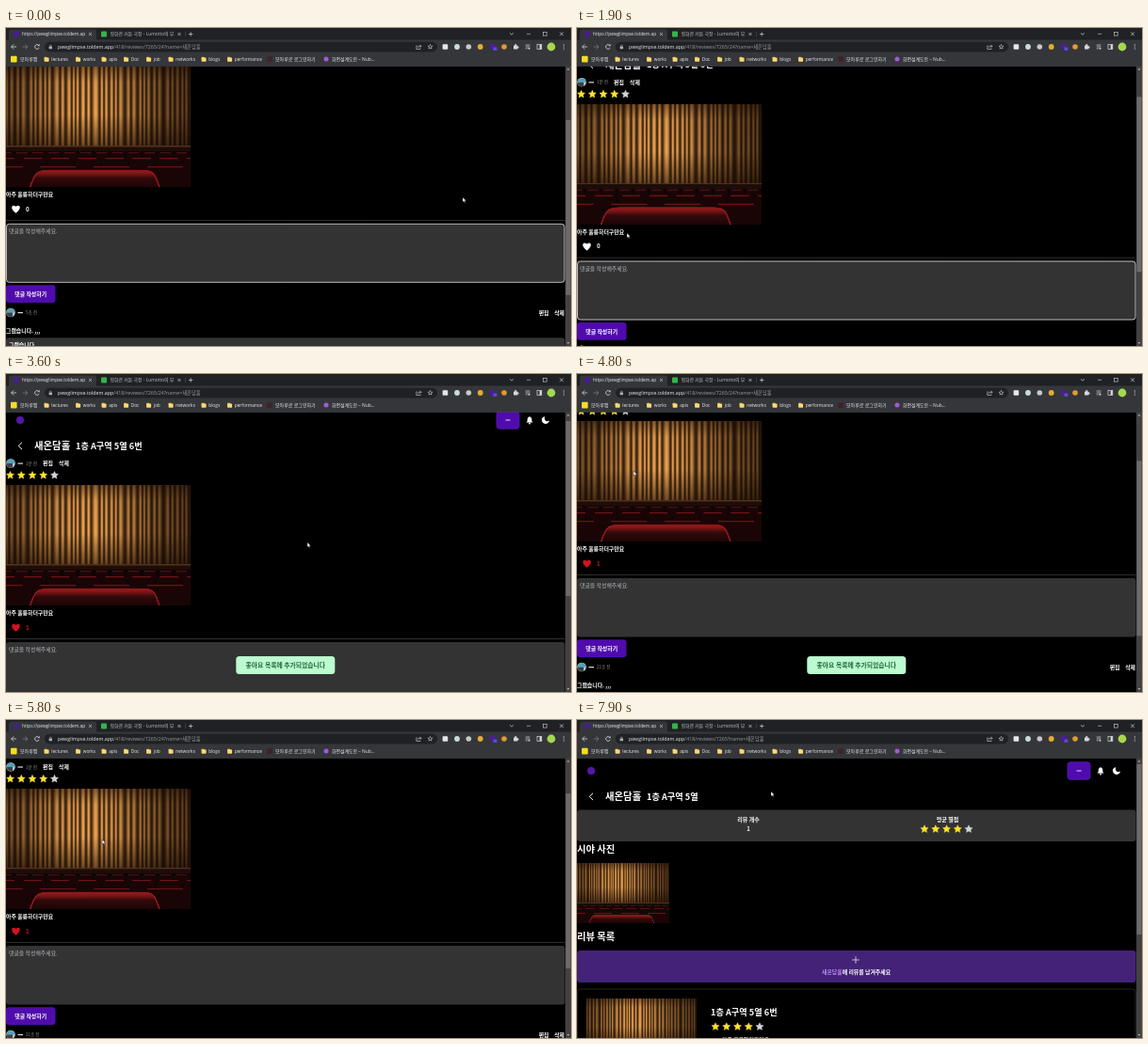
These frames come from a looping animation (600 px wide and 338 px high, 8000 ms). An HTML page with a canvas:

```html
<!DOCTYPE html>
<html lang="ko">
<head>
<meta charset="utf-8">
<title>Seat review</title>
<style>
html, body { margin: 0; width: 100%; height: 100%; overflow: hidden; background: #000; }
canvas { display: block; width: 600px; height: 338px; }
</style>
</head>
<body>
<canvas id="stage"></canvas>
<script>
const W = 600, H = 338, LOOP = 8000, TOP = 40.5, PAGE_W = 593.5;
const PAGE_FONT = '"Noto Sans CJK KR", "Noto Sans CJK", "Noto Sans", sans-serif';
const UI_FONT = '"Open Sans", "Noto Sans CJK KR", "Noto Sans CJK", sans-serif';
const VENUE = '새온담홀', HOST = 'pewglimpse.toldem.app';
const PURPLE = '#500bad', GREY = '#333333';

const canvas = document.getElementById('stage');
const dpr = window.devicePixelRatio || 1;
canvas.width = W * dpr;
canvas.height = H * dpr;
let c = canvas.getContext('2d');

function rect(x, y, w, h, fill) {
  c.fillStyle = fill;
  c.fillRect(x, y, w, h);
}
function round(x, y, w, h, r, fill, stroke, lw = 1) {
  c.beginPath();
  c.roundRect(x, y, w, h, r);
  if (fill) { c.fillStyle = fill; c.fill(); }
  if (stroke) { c.strokeStyle = stroke; c.lineWidth = lw; c.stroke(); }
}
function dot(x, y, r, fill) {
  c.beginPath();
  c.arc(x, y, r, 0, Math.PI * 2);
  c.fillStyle = fill;
  c.fill();
}
function line(pts, color, lw = 0.8) {
  c.beginPath();
  for (let i = 0; i < pts.length; i += 2) c.lineTo(pts[i], pts[i + 1]);
  c.strokeStyle = color;
  c.lineWidth = lw;
  c.stroke();
}
function poly(pts, fill, stroke, lw) {
  c.beginPath();
  for (let i = 0; i < pts.length; i += 2) c.lineTo(pts[i], pts[i + 1]);
  c.closePath();
  c.fillStyle = fill;
  c.fill();
  if (stroke) { c.strokeStyle = stroke; c.lineWidth = lw; c.stroke(); }
}
function text(s, x, y, size, color = '#fff', weight = 700, align = 'left', font = PAGE_FONT) {
  c.font = `${weight} ${size}px ${font}`;
  c.textAlign = align;
  c.textBaseline = 'alphabetic';
  c.fillStyle = color;
  c.fillText(s, x, y + size * 0.36);
}
const uiText = (s, x, y, size, color) => text(s, x, y, size, color, 400, 'left', UI_FONT);

// Eased interpolation through [time, ...values] keys
function track(keys, t) {
  let i = 0;
  while (i < keys.length - 2 && t >= keys[i + 1][0]) i++;
  const a = keys[i], b = keys[i + 1];
  const p = Math.min(1, Math.max(0, (t - a[0]) / (b[0] - a[0])));
  const e = p * p * (3 - 2 * p);
  return a.slice(1).map((v, k) => v + (b[k + 1] - v) * e);
}

const scrollKeys = [[0, 77], [200, 77], [520, 37.3], [3250, 37.3], [3600, 0], [3700, -5],
  [4600, -5], [4800, 68], [5000, 73], [5380, 155], [5550, 155], [5950, -5], [8000, -5]];
const pointerKeys = [[0, 485, 180], [1000, 485, 180], [1800, 53, 218], [1950, 53, 218],
  [2200, 11, 231], [2650, 11, 231], [3350, 320, 179], [3750, 320, 179], [4500, 60, 103],
  [4800, 60, 103], [5200, 154, 152], [5550, 154, 152], [6150, 17, 86], [6800, 17, 86],
  [7600, 206, 76], [8000, 206, 76]];
const LIKE = 2250, BACK = 6400, LOADED = 7000;

// Seat row: dark backs with a dim red upper edge
function seatRow(start, y, step, h, edge) {
  for (let x = start; x < 196; x += step) {
    round(x, y, step - 1.5, h, step * 0.16, '#190506');
    line([x + step * 0.13, y + 0.6, x + step * 0.8, y + 0.6], edge, 1.5);
  }
}

// Lit stage curtain above rows of seats, drawn once
const photo = document.createElement('canvas');
photo.width = 784;
photo.height = 512;
function paintPhoto() {
  const main = c;
  c = photo.getContext('2d');
  c.scale(4, 4);
  rect(0, 0, 196, 128, '#100405');
  for (let x = 0; x < 196; x += 0.5) {
    const fold = 0.5 + 0.5 * Math.sin(x * 1.08 + 1.5 * Math.sin(x * 0.17) + 0.7 * Math.sin(x * 0.43));
    const light = 0.36 + 0.64 * Math.exp(-(((x - 86) / 66) ** 2));
    const v = (0.24 + 0.76 * fold) * light;
    rect(x, 0, 0.6, 85, `rgb(${245 * v + 8},${172 * v + 1},${84 * v})`);
  }
  const shade = c.createLinearGradient(0, 0, 0, 85);
  shade.addColorStop(0, 'rgba(20,8,2,.5)');
  shade.addColorStop(0.2, 'rgba(20,8,2,.1)');
  shade.addColorStop(0.6, 'rgba(20,8,2,.05)');
  shade.addColorStop(1, 'rgba(20,8,2,.6)');
  rect(0, 0, 196, 85, shade);
  rect(0, 84, 196, 1.6, '#54301a');
  rect(0, 85.6, 196, 4.4, '#1c0d08');
  seatRow(-8, 91, 17, 10, '#4c1012');
  seatRow(-14, 97, 29, 14, '#6c1416');
  seatRow(-28, 106, 57, 26, '#6c1215');
  c.beginPath();
  c.moveTo(25, 130);
  c.bezierCurveTo(31, 113, 32, 111, 46, 110.5);
  c.lineTo(145, 110.5);
  c.bezierCurveTo(158, 111, 158, 113, 164, 130);
  c.closePath();
  const seat = c.createLinearGradient(0, 109, 0, 128);
  seat.addColorStop(0, '#a81c20');
  seat.addColorStop(0.25, '#7d1417');
  seat.addColorStop(0.5, '#330a0b');
  seat.addColorStop(1, '#1c0506');
  c.fillStyle = seat;
  c.fill();
  c.strokeStyle = '#8f181b';
  c.lineWidth = 1.6;
  c.stroke();
  c = main;
}
const drawPhoto = (x, y, w, h) => c.drawImage(photo, x, y, w, h);

function star(x, y, fill) {
  const pts = [];
  for (let i = 0; i < 10; i++) {
    const r = i % 2 ? 2.1 : 4.3, a = i * Math.PI / 5 - Math.PI / 2;
    pts.push(x + r * Math.cos(a), y + r * Math.sin(a));
  }
  poly(pts, fill, fill, 0.4);
}
function stars(x, y) {
  for (let i = 0; i < 5; i++) star(x + i * 11.75, y, i < 4 ? '#fde32f' : '#d2d5da');
}
function heart(x, y, fill) {
  c.beginPath();
  c.moveTo(x, y + 4.2);
  c.bezierCurveTo(x - 7, y - 0.5, x - 4.3, y - 6, x, y - 2.7);
  c.bezierCurveTo(x + 4.3, y - 6, x + 7, y - 0.5, x, y + 4.2);
  c.fillStyle = fill;
  c.fill();
}
function avatar(y) {
  dot(5, y, 4.8, '#b9c4ca');
  c.save();
  c.beginPath();
  c.arc(5, y, 4.5, 0, 7);
  c.clip();
  rect(0, y - 5, 10, 5, '#53a2b8');
  rect(0, y, 7, 5, '#35434d');
  c.restore();
}
function author(y, ago) {
  avatar(y);
  rect(12.5, y - 0.5, 5.5, 1.2, '#ddd');
  text(ago, 21, y, 4.6, '#8b8b8b', 400);
}
function textarea(y, s, color, weight, focus) {
  round(0, y, PAGE_W, 62.5, 3, GREY);
  if (focus) round(0.5, y + 0.3, PAGE_W - 1, 62, 3, null, '#dedede', 0.8);
  text(s, 3, y + 8, 5.9, color, weight);
}
function submit(y) {
  round(0, y, 52.5, 18.7, 3, PURPLE);
  text('댓글 작성하기', 26.2, y + 9.4, 5.9, '#fff', 700, 'center');
}

function header(y, seat, hover) {
  dot(15, y, 4, '#5716a8');
  round(521, y - 9.2, 24, 18.4, 3, PURPLE, '#5d1fcc', 0.7);
  rect(530.5, y - 0.5, 5, 1, '#e4d8f5');
  // bell
  poly([552.5, y + 2.5, 553.7, y + 1, 553.7, y - 1.6, 555, y - 3.4, 557, y - 3.4,
    558.3, y - 1.6, 558.3, y + 1, 559.5, y + 2.5], '#fff');
  dot(556, y + 3.4, 1, '#fff');
  // moon
  c.beginPath();
  c.arc(573, y, 4, -1.9, 0.25, true);
  c.arc(574.8, y - 1.8, 2.9, 0.9, -2.6);
  c.closePath();
  c.fillStyle = '#fff';
  c.fill();
  const ty = y + 27.4;
  line([17, ty - 3.7, 13.2, ty, 17, ty + 3.7], hover ? '#7131d4' : '#fff', 1);
  text(VENUE, 30, ty, 10.4);
  text(seat, 74, ty, 9.2);
}

function reviewPage(t, scroll) {
  const liked = t >= LIKE, red = '#cf1420';
  c.save();
  c.translate(0, -scroll);
  header(49, '1층 A구역 5열 6번', t > 6050);
  author(95, '1분 전');
  text('편집', 39, 95, 5.9);
  text('삭제', 56, 95, 5.9);
  stars(4.5, 107.7);
  drawPhoto(0, 118, 195.5, 128);
  text('아주 훌륭하더구만요', 0, 254, 5.9);
  heart(10.5, 269.5, liked ? red : '#fff');
  text(liked ? '1' : '0', 21, 269.5, 6.2, liked ? red : '#fff');
  rect(0, 281, PAGE_W, 0.9, '#343434');
  textarea(285, '댓글을 작성해주세요.', '#b4b8bf', 400, !liked);
  submit(350.3);
  author(379.5, t < 2500 ? '5초 전' : '21초 전');
  text('편집', 576.5, 379.5, 5.9, '#fff', 700, 'right');
  text('삭제', 593, 379.5, 5.9, '#fff', 700, 'right');
  text('그랬습니다. ,,,', 0, 398.7, 5.9);
  textarea(406.3, '그랬습니다. ,,,', '#fff', 700, false);
  submit(471.7);
  c.restore();
}

function seatPage(t) {
  const loaded = t >= LOADED, d = loaded ? -34 : 0;
  header(54, '1층 A구역 5열', t < 6950);
  round(0, 95.5, PAGE_W, 33.5, 3, GREY);
  text('리뷰 개수', 182, 106, 6, '#fff', 700, 'center');
  text('1', 182, 115.5, 6, '#fff', 700, 'center');
  text('평균 별점', 393.5, 106, 6, '#fff', 700, 'center');
  stars(369, 116);
  text('시야 사진', 0, 137, 10.3);
  if (loaded) drawPhoto(0, 152, 98, 64);
  else round(0, 152, 98, 98, 3, GREY);
  text('리뷰 목록', 0, 264 + d, 10.3);
  round(0, 279 + d, PAGE_W, 34, 3, '#432277');
  line([292.2, 289 + d, 299.8, 289 + d], '#ddd', 0.8);
  line([296, 285.2 + d, 296, 292.8 + d], '#ddd', 0.8);
  const tail = '에 리뷰를 남겨주세요';
  text(VENUE, 260, 302 + d, 5.9, '#b78af0');
  text(tail, 260 + c.measureText(VENUE).width, 302 + d, 5.9);
  if (!loaded) {
    round(6, 326, 118, 80, 3, GREY);
    return;
  }
  round(0.5, 286, PAGE_W - 1, 100, 3, null, '#2b2b2b', 0.8);
  drawPhoto(10, 295.5, 117, 76);
  text('1층 A구역 5열 6번', 142, 311, 9.2);
  stars(147, 326);
  text('아주 훌륭하더구만요', 154, 340, 5.9, '#ddd');
}

function scrollbar(top, len) {
  rect(594, TOP, 6, H, '#424242');
  rect(594.5, top, 5, len, '#6b6b6b');
  poly([595.6, 44.5, 598.4, 44.5, 597, 42.7], '#bbb');
  poly([595.6, 334, 598.4, 334, 597, 335.8], '#bbb');
}

function toast(t) {
  const a = track([[0, 0], [2350, 0], [2600, 1], [5550, 1], [5750, 0], [8000, 0]], t)[0];
  if (!a) return;
  c.save();
  c.globalAlpha = a;
  c.translate(0, (1 - a) * 12);
  round(244.3, 300, 105, 19, 3.5, '#bbfbcf');
  text('좋아요 목록에 추가되었습니다', 296.8, 309.5, 6.8, '#24693b', 700, 'center');
  c.restore();
}

function folder(x) {
  round(x - 2.4, 30.8, 3, 2, 0.5, '#e9b84c');
  round(x - 2.4, 31.5, 5, 4.2, 0.6, '#fbd774');
}
function cross(x, y, r, color) {
  line([x - r, y - r, x + r, y + r], color, 0.7);
  line([x + r, y - r, x - r, y + r], color, 0.7);
}
function clipped(s, x, y, w, size, color) {
  c.save();
  c.beginPath();
  c.rect(x, 0, w, 13);
  c.clip();
  uiText(s, x, y, size, color);
  c.restore();
}

function browser(t) {
  const pale = '#d5d7da';
  rect(0, 0, W, 13, '#202124');
  rect(0, 12.5, W, 28, '#35363a');
  round(3, 1.5, 93, 14, [3, 3, 0, 0], '#35363a');
  dot(11, 6.5, 2.9, '#4a1b98');
  clipped(`https://${HOST}/41`, 17, 6.5, 67, 4.8, '#e8eaed');
  cross(89.5, 6.5, 1.4, pale);
  round(101, 3.5, 6, 6, 0.8, '#35b34a');
  clipped('영화관 커튼 극장 - Lumotto의 무료', 110.5, 6.5, 68, 4.9, '#c0c3c7');
  cross(184, 6.5, 1.4, pale);
  rect(190, 4, 0.5, 5, '#55575b');
  line([194, 6.5, 198.4, 6.5], pale, 0.7);
  line([196.2, 4.3, 196.2, 8.7], pale, 0.7);
  line([535, 5.3, 537, 7.2, 539, 5.3], pale, 0.7);
  line([553, 6.3, 557, 6.3], pale, 0.6);
  c.strokeStyle = pale;
  c.lineWidth = 0.6;
  c.strokeRect(570.6, 4.5, 3.6, 3.6);
  cross(590, 6.3, 1.9, pale);

  // toolbar
  line([11, 20, 5.6, 20], pale);
  line([8.2, 17.4, 5.6, 20, 8.2, 22.6], pale);
  line([17.6, 20, 23, 20], '#77797d');
  line([20.4, 17.4, 23, 20, 20.4, 22.6], '#77797d');
  c.beginPath();
  c.arc(33, 20, 2.4, 0.4, 5.4);
  c.strokeStyle = pale;
  c.stroke();
  poly([33.4, 19.2, 35.6, 19.2, 35.6, 17], pale);
  round(41, 14.8, 417, 10.6, 5.3, '#202124');
  round(45.6, 19.4, 3.4, 2.9, 0.4, '#aeb1b5');
  c.beginPath();
  c.arc(47.3, 19.3, 1.1, Math.PI, 0);
  c.strokeStyle = '#aeb1b5';
  c.lineWidth = 0.6;
  c.stroke();
  uiText(HOST, 55, 20.2, 5.3, '#e8eaed');
  const hostW = c.measureText(HOST).width;
  uiText(`/418/reviews/7265${t < BACK ? '/24' : ''}?name=${VENUE}`, 55 + hostW, 20.2, 5.3, '#989ca1');
  line([436.5, 18.8, 435.8, 18.8, 435.8, 22.5, 440, 22.5, 440, 21.5], pale, 0.6);
  line([437.4, 21, 438, 19.3, 441, 19.3], pale, 0.6);
  line([439.5, 17.8, 441, 19.3, 439.5, 20.8], pale, 0.6);
  c.save();
  c.translate(450.5, 20);
  c.scale(0.64, 0.64);
  star(0, 0, pale);
  c.scale(0.6, 0.6);
  star(0, 0, '#202124');
  c.restore();
  round(463.6, 17.2, 5.6, 5.6, 0.8, '#e6e6e6');
  dot(479, 20, 2.9, '#c9dcd8');
  dot(491.3, 20, 2.8, '#c6c8cb');
  dot(503.7, 20, 2.9, '#e2ad32');
  round(513.6, 17, 5.6, 5.6, 0.8, '#4c1d95');
  rect(517.5, 20.5, 3.8, 3.4, '#5d49df');
  dot(529, 20, 2.8, '#e39a31');
  round(539, 18.4, 4.4, 4.2, 0.5, pale);
  dot(541.2, 18, 1, pale);
  dot(543.6, 20.4, 1, pale);
  for (let i = 0; i < 3; i++) {
    line([551.7, 18 + i * 1.9, i < 2 ? 556.4 : 553.8, 18 + i * 1.9], pale, 0.7);
    dot(592.3, 17.9 + i * 2.1, 0.6, pale);
  }
  dot(555.5, 21.8, 1, pale);
  c.strokeStyle = pale;
  c.lineWidth = 0.7;
  c.strokeRect(564, 17.6, 4.8, 4.8);
  rect(566.6, 17.6, 2.2, 4.8, pale);
  dot(579, 20, 4.4, '#a5d84f');

  // bookmarks
  round(5, 29.8, 6.6, 6.6, 1, '#f4dc26');
  uiText('모아루맵', 15, 33.2, 5, '#e8eaed');
  const marks = [['lectures', 43], ['works', 76.5], ['apis', 104], ['Doc', 127.5], ['job', 151.5],
    ['networks', 175], ['blogs', 210], ['performance', 237.5]];
  for (const [name, x] of marks) {
    folder(x);
    uiText(name, x + 5.2, 33.2, 4.8, '#e8eaed');
  }
  round(277.3, 30.3, 5.6, 5.6, 0.8, '#402326');
  uiText('모아루로 로그인하기', 286, 33.2, 5, '#e8eaed');
  dot(340, 33.1, 2.5, '#a259d9');
  uiText('화면설계도안 – Nub...', 346, 33.2, 4.9, '#e8eaed');
  rect(0, 40, W, 0.5, '#4a4b4f');
}

function pointer(t, scroll) {
  const [x, y] = track(pointerKeys, t);
  const py = y + scroll;
  const onText = t < BACK && ((py > 285 && py < 347) || (py > 406 && py < 469));
  const onLink = (t < BACK && x < 26 && py > 263 && py < 277) || (t > 6050 && t < 6950);
  c.save();
  c.translate(x, y);
  if (onText) {
    line([-1.2, -3, 1.2, -3], '#111', 0.6);
    line([0, -3, 0, 3], '#111', 0.7);
    line([-1.2, 3, 1.2, 3], '#111', 0.6);
  } else if (onLink) {
    poly([0, 0, 1.3, 0, 1.5, 2.6, 4, 3.2, 4.2, 5.5, 3.4, 7.3, 0.3, 7.3, -1.6, 4.6, -1, 3.9, 0, 4.6],
      '#fff', '#111', 0.4);
  } else {
    poly([0, 0, 0, 5, 1.2, 4, 2, 5.8, 2.9, 5.4, 2.1, 3.7, 3.6, 3.6], '#fff', '#111', 0.4);
  }
  c.restore();
}

function draw(now) {
  const t = now % LOOP;
  const [scroll] = track(scrollKeys, t);
  c.setTransform(dpr, 0, 0, dpr, 0, 0);
  rect(0, 0, W, H, '#000');
  if (t < BACK) {
    reviewPage(t, scroll);
    scrollbar(47 + (scroll + 5) * 0.62, 186);
  } else {
    seatPage(t);
    scrollbar(47, 181);
  }
  toast(t);
  browser(t);
  pointer(t, scroll);
}

paintPhoto();
const start = performance.now();
function tick() {
  draw(performance.now() - start);
  requestAnimationFrame(tick);
}
tick();
</script>
</body>
</html>
```
